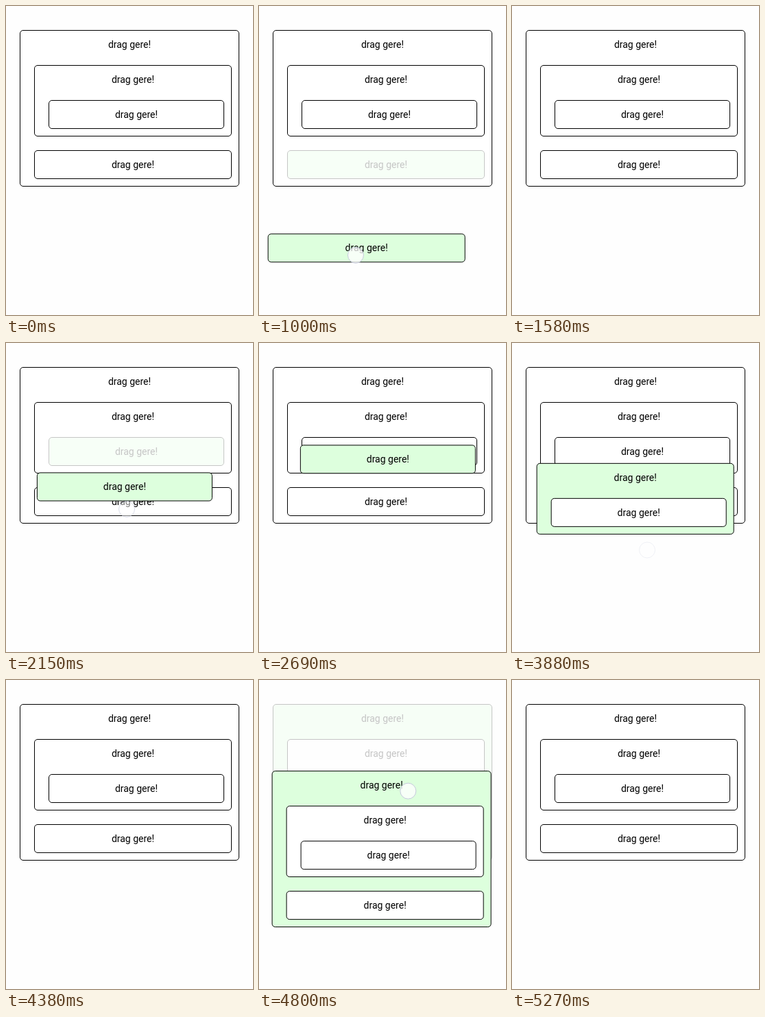
These frames come from a looping animation (360 px wide and 450 px high, 5.53 s). An HTML page:

```html
<!DOCTYPE html>
<html lang="en">
<head>
<meta charset="utf-8">
<title>Nested drag</title>
<style>
html, body { margin: 0; width: 100%; height: 100%; overflow: hidden; background: #fefefe; }
#stage { position: relative; width: 360px; height: 450px; overflow: hidden; font: 14px/20px Roboto, sans-serif; color: #000; text-align: center; }
.box { box-sizing: border-box; padding: 10px; border: 1px solid #000; border-radius: 5px; background: #fff; }
.box > .box { margin: 20px 0 0 10px; }
#outer { position: absolute; left: 20px; top: 35px; width: 320px; }
.box.held { opacity: .22; background: #dfd; }
.box.lift { position: absolute; margin: 0; background: #dfd; visibility: hidden; }
#touch { position: absolute; left: -12px; top: -12px; width: 24px; height: 24px; box-sizing: border-box; border: 1.5px solid #c5c9dc; border-radius: 50%; background: rgba(255, 255, 255, .75); opacity: 0; }
</style>
</head>
<body>
<div id="stage">
  <div class="box" id="outer">drag gere!
    <div class="box" id="group">drag gere!
      <div class="box" id="leaf">drag gere!</div>
    </div>
    <div class="box" id="last">drag gere!</div>
  </div>
  <div id="touch"></div>
</div>
<script>
const LOOP = 5530, SNAP = 276, LEAD = 30, FADE_IN = 260, FADE_OUT = 190;
const stage = document.getElementById('stage');
const touch = document.getElementById('touch');

// start/end: finger travel, drop: release, grab: press point, bend: how x trails y
const drags = [
  { id: 'last', start: 320, end: 1270, drop: 1296, dx: -32, dy: 149, grab: [170, 236], bend: .6 },
  { id: 'leaf', start: 2010, end: 2440, drop: 2456, dx: -40, dy: 212, grab: [197, 169.5], bend: .6 },
  { id: 'group', start: 3000, end: 3660, drop: 3740, dx: -11, dy: 184, grab: [208, 117.5], bend: 1 },
  { id: 'outer', start: 4444, end: 5026, drop: 4990, dx: -3, dy: 144, grab: [219, 54], bend: 2 }
];

const clamp = v => Math.min(1, Math.max(0, v));
const ease = v => (1 - Math.cos(Math.PI * clamp(v))) / 2;
const place = (el, x, y) => { el.style.transform = `translate(${x}px, ${y}px)`; };

for (const d of drags) {
  d.el = document.getElementById(d.id);
  const r = d.el.getBoundingClientRect();
  const lift = d.lift = d.el.cloneNode(true);
  for (const n of [lift, ...lift.querySelectorAll('[id]')]) n.removeAttribute('id');
  lift.classList.add('lift');
  Object.assign(lift.style, { left: r.left + 'px', top: r.top + 'px', width: r.width + 'px' });
  stage.insertBefore(lift, touch);
}

function travel(d, t) {
  const p = ease((Math.min(t, d.drop) - d.start) / (d.end - d.start));
  return [d.dx * p ** d.bend, d.dy * p];
}

function draw(t) {
  let shade = 0;
  for (const d of drags) {
    const [x, y] = travel(d, t);
    const back = 1 - ease((t - d.drop) / SNAP);
    d.el.classList.toggle('held', t >= d.start && t < d.drop);
    d.lift.style.visibility = t >= d.start && t < d.drop + SNAP ? 'visible' : 'hidden';
    place(d.lift, x * back, y * back);

    const press = d.start - 30;
    if (t >= press && t < d.drop + FADE_OUT) {
      const [cx, cy] = travel(d, t + LEAD);
      shade = clamp((t - press) / FADE_IN) * (1 - clamp((t - d.drop) / FADE_OUT));
      place(touch, d.grab[0] + cx, d.grab[1] + cy);
    }
  }
  touch.style.opacity = shade;
}

const t0 = performance.now();
function tick() {
  draw((performance.now() - t0) % LOOP);
  requestAnimationFrame(tick);
}
tick();
</script>
</body>
</html>
```
